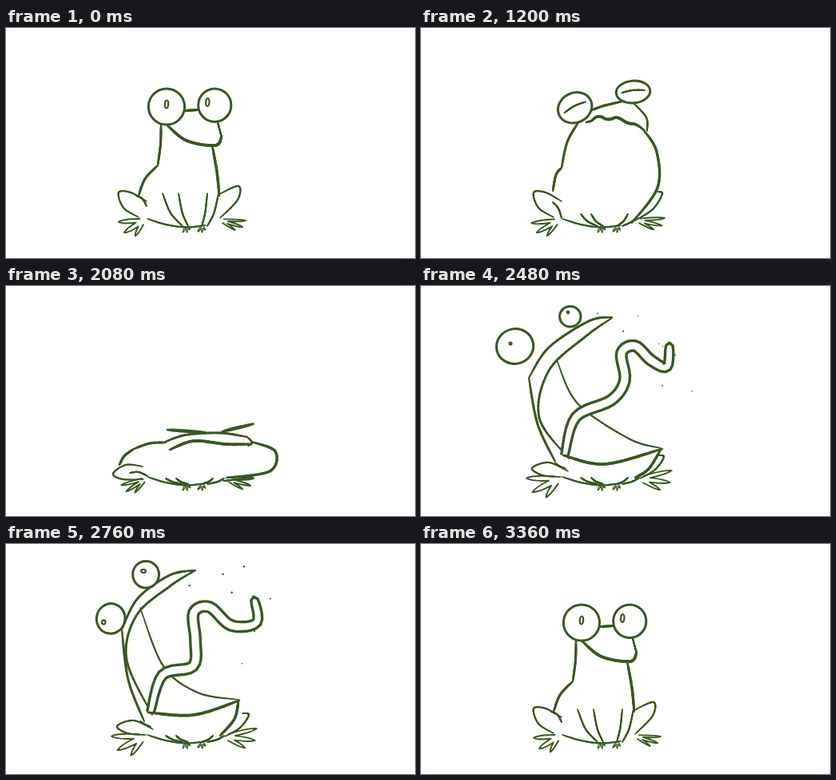
Write an HTML page with a canvas that moves like this. It is 512 px wide and 288 px high and loops after 3440 ms.

```html
<!DOCTYPE html>
<html lang="en">
<head>
<meta charset="utf-8">
<title>Frog</title>
<style>
html, body { margin: 0; width: 100%; height: 100%; overflow: hidden; background: #fff; }
canvas { display: block; width: 100vw; height: 100vh; }
</style>
</head>
<body>
<canvas id="stage" width="512" height="288"></canvas>
<script>
const ctx = document.getElementById('stage').getContext('2d');
const INK = '#37591f';
const LOOP = 3440, TICK = 40;
const RAD = Math.PI / 180;
const WEIGHT = { back: 2.9, hip: 2.9, side: 3.3, top: 2.9, mouth: 3.7 };

const lerp = (a, b, u) => a + (b - a) * u;
const spline = (a, b, c, d, u) =>
  b + .5 * u * (c - a + u * (2 * a - 5 * b + 4 * c - d + u * (3 * (b - c) + d - a)));

// Smooth line through x, y pairs, as evenly counted samples.
function curve(...p) {
  const n = p.length / 2, count = 48, out = [];
  const at = (i, k) => p[2 * Math.max(0, Math.min(n - 1, i)) + k];
  for (let j = 0; j <= count; j++) {
    const s = j / count * (n - 1), i = Math.min(n - 2, Math.floor(s));
    out.push([0, 1].map(k => spline(at(i - 1, k), at(i, k), at(i + 1, k), at(i + 2, k), s - i)));
  }
  return out;
}

// Arms run from a common height down to the two hands.
function arms(top, starts = [200, 213, 259, 273]) {
  const ends = [221, 228, 245, 252];
  return starts.map((x, i) =>
    curve(x, top, lerp(x, ends[i], .4), lerp(top, 248, .6), ends[i], 248));
}

// Trembling lip: a sagging line with a fading ripple.
function wobble() {
  const points = [];
  for (let u = 0; u <= 1.01; u += .08) {
    const ripple = 2.8 * (1 - u * .7) * Math.cos(2 * Math.PI * (u - .2) / .32);
    points.push(207 + 76 * u, 116 - 23 * u + 37 * u * u - ripple);
  }
  return curve(...points);
}

// Eyes: x, y, rx, ry, tilt. Pupils: offset x, y, rx, ry.
// Paws: x, y, angle of the outer toe, angle between toes, length.
const sit = {
  eyes: [[201, 98.5, 22.6, 22.6, 0], [261.3, 96.7, 20.6, 20.7, 0]],
  pupils: [[0, -3, 2.2, 5], [-9, -3.7, 2.2, 5]],
  arms: arms(207, [196, 216, 252, 266]),
  paws: [[174, 240, 175, -27, 33], [266, 240, 2, 15, 34]],
  lines: {
    back: curve(194, 121, 193.5, 145, 190, 172),
    hip: curve(190, 172, 174, 189, 166, 210),
    side: curve(258.5, 149, 264, 180, 267, 210),
    thighLeft: curve(176, 217, 156, 206, 141, 206, 147, 225, 166, 237),
    shin: curve(163, 210, 171, 214, 176, 223),
    thighRight: curve(267, 208, 291, 198, 290, 215, 268, 238),
    top: curve(224, 103.5, 241, 102.5),
    lip: curve(265, 118, 270, 137),
    mouth: curve(201, 121, 226, 141, 262, 147, 270, 135)
  }
};

const puff = {
  eyes: [[192.7, 99.8, 21.8, 18.6, -.45], [265.6, 80, 21.3, 13.9, -.08]],
  pupils: [[-2.2, -5.1, .5, .5], [5.6, -4, 2.2, 2.2]],
  arms: arms(233),
  paws: [[174, 240, 173, -22, 36], [267, 240, -3, 15, 38]],
  lines: {
    back: curve(197, 118, 183, 143, 176, 175),
    hip: curve(176, 175, 169, 184, 165, 204),
    side: curve(279, 128, 295, 155, 296, 200, 264, 244),
    thighLeft: sit.lines.thighLeft,
    shin: curve(165, 218, 172, 226, 176, 238),
    thighRight: curve(296, 205, 302, 208, 290, 227, 268, 241),
    top: curve(213, 103, 230, 97, 252, 92),
    lip: curve(266, 94, 282, 112, 283, 129),
    mouth: wobble()
  }
};

const squat = {
  eyes: [[226, 181.7, 24, .7, .07], [290, 177.5, 20, .7, -.24]],
  pupils: [[0, 0, 0, 0], [0, 0, 0, 0]],
  arms: arms(241),
  paws: [[177, 240, 164, -17, 34], [273, 241, 0, 15, 37]],
  lines: {
    back: curve(200, 196, 180, 197, 160, 204),
    hip: curve(160, 204, 148, 213, 142, 224),
    side: curve(307, 195, 337, 207, 330, 232, 276, 240),
    thighLeft: curve(171, 226, 150, 224, 134, 235, 146, 242, 172, 242),
    shin: curve(155, 234, 166, 233, 177, 238),
    thighRight: curve(309, 239, 290, 242, 272, 244),
    top: curve(197, 196, 225, 186.5, 268, 184, 302, 189),
    lip: curve(302, 189, 308, 196, 303, 200),
    mouth: curve(205, 205, 235, 194, 275, 198, 306, 198)
  }
};

const leanBack = {
  eyes: [[117.6, 75.5, 23.2, 21.8, -.2], [186.8, 38.2, 13.2, 12.8, 0]],
  pupils: [[-5.6, -3.5, 1.5, 1.5], [-2.8, -5.2, 1.3, 1.3]],
  arms: arms(240),
  paws: [[175, 240, 179, -26, 43], [271, 241, -13, 20, 44]],
  lines: {
    back: curve(239, 39, 210, 44, 160, 77, 135, 115),
    hip: curve(135, 115, 146, 173, 168, 220),
    side: curve(300, 205, 285, 229, 268, 240),
    thighLeft: curve(184, 232, 160, 221, 139, 228, 152, 237, 175, 239),
    shin: curve(168, 222, 174, 226, 181, 229),
    thighRight: curve(296, 212, 304, 214, 293, 230, 274, 241),
    top: curve(239, 40, 205, 64, 160, 106, 148, 165, 185, 216),
    lip: curve(170, 93, 196, 147, 260, 191, 300, 203),
    mouth: curve(178, 212, 230, 223, 302, 204)
  },
  tongue: curve(180, 211, 194, 164, 238, 143, 255, 118, 251, 84, 268, 75, 288, 93, 308, 101, 311, 71)
};

const leanFront = {
  ...leanBack,
  eyes: [[131.2, 93.4, 17.8, 18.8, .2], [175.1, 38.2, 16.4, 16.8, 0]],
  pupils: [[-8.9, 4.6, 2.2, 2.6], [-3.1, -4.4, 3, 2]],
  lines: {
    ...leanBack.lines,
    back: curve(237, 33, 205, 39, 165, 68, 145, 107),
    hip: curve(145, 107, 153, 170, 173, 222),
    side: curve(291, 196, 286, 219, 268, 240),
    top: curve(237, 33, 205, 53, 163, 90, 151, 145, 183, 214),
    lip: curve(168, 80, 197, 153, 240, 186, 291, 195),
    mouth: curve(178, 211, 235, 214, 292, 196)
  },
  tongue: curve(181, 210, 196, 164, 234, 153, 237, 120, 235, 86, 255, 79, 282, 102, 314, 98, 310, 66)
};

const belly = curve(177, 239, 200, 246, 226, 249.5, 250, 247);
const hands = [[226, 247, 118, -33, 10], [246, 247, 126, -33, 10]];

// Blends numbers, lists and objects of the same form.
function mix(a, b, u) {
  if (typeof a === 'number') return lerp(a, b, u);
  if (Array.isArray(a)) return a.map((v, i) => mix(v, b[i], u));
  const out = {};
  for (const key in a) if (key in b) out[key] = mix(a[key], b[key], u);
  return out;
}

// Brush line, thinner towards both ends.
function brush(points, weight = 2.2) {
  for (let i = 1; i < points.length; i++) {
    const u = (i - .5) / (points.length - 1);
    ctx.lineWidth = weight * (.65 + .35 * Math.min(1, 5 * Math.min(u, 1 - u)));
    ctx.beginPath();
    ctx.moveTo(...points[i - 1]);
    ctx.lineTo(...points[i]);
    ctx.stroke();
  }
}

// Three toes spread like a fan, joined by notches.
function drawPaw([x, y, angle, gap, length]) {
  const polar = (turn, r) => {
    const a = (angle + gap * turn) * RAD;
    return [x + Math.cos(a) * r, y + Math.sin(a) * r];
  };
  const notch = turn => polar(turn, length * (turn < 0 || turn > 2 ? .2 : .36));
  ctx.lineWidth = length < 15 ? 1.3 : 1.9;
  ctx.beginPath();
  ctx.moveTo(...notch(-.5));
  for (let toe = 0; toe < 3; toe++) {
    const reach = length * (1 - .07 * toe * toe);
    ctx.quadraticCurveTo(...polar(toe - .25, reach * .85), ...polar(toe, reach));
    ctx.quadraticCurveTo(...polar(toe + .25, reach * .85), ...notch(toe + .5));
  }
  ctx.stroke();
}

// Tube around a centre line, open at the root and round at the tip.
function drawTongue(points, grow) {
  const n = Math.floor((points.length - 1) * grow);
  if (n < 5) return;
  const left = [], right = [];
  for (let i = 0; i <= n; i++) {
    const [x, y] = points[i], a = points[Math.max(0, i - 1)], b = points[Math.min(n, i + 1)];
    const dx = b[0] - a[0], dy = b[1] - a[1], size = Math.hypot(dx, dy) || 1;
    const cap = Math.sqrt(1 - Math.max(0, 1 - (n - i) / 2) ** 2);
    const half = Math.min(6.3, 4.3 + i * .25) * lerp(1, .75, Math.max(0, i / n * 4 - 3)) * cap;
    const ox = -dy / size * half, oy = dx / size * half;
    left.push([x + ox, y + oy]);
    right.unshift([x - ox, y - oy]);
  }
  ctx.lineWidth = 3.4;
  ctx.beginPath();
  left.concat(right).forEach(p => ctx.lineTo(...p));
  ctx.fill();
  ctx.stroke();
}

function drawOval(x, y, rx, ry, tilt, weight) {
  ctx.lineWidth = weight;
  ctx.beginPath();
  ctx.ellipse(x, y, Math.max(.1, rx), Math.max(.1, ry), tilt, 0, 7);
  ctx.fill();
  ctx.stroke();
}

function drawEye([x, y, rx, ry, tilt], [px, py, prx, pry], shut) {
  drawOval(x, y, rx, ry, tilt, 3);
  if (shut) {
    const dx = Math.cos(tilt) * rx * .68, dy = Math.sin(tilt) * rx * .68;
    brush(curve(x - dx, y - dy, x - 1, y - 2, x + dx, y + dy - 1));
  } else if (prx > .2) {
    drawOval(x + px, y + py, prx, pry, .05, 2.2);
  }
}

// Repeatable noise in 0..1
const noise = seed => Math.abs(Math.sin(seed * 127.1) * 43758.5453) % 1;

function drawSpit(age) {
  const burst = Math.floor(age / 280), flown = age % 280 / 280;
  ctx.fillStyle = INK;
  for (let i = 1; i < 9; i++) {
    const seed = i + burst * 20;
    const angle = lerp(-115, 35, noise(seed)) * RAD;
    const far = lerp(60, 115, noise(seed + .3)) * lerp(.8, 1.2, flown);
    ctx.beginPath();
    ctx.arc(235 + Math.cos(angle) * far, 120 + Math.sin(angle) * far, lerp(.6, 1.5, noise(seed + .6)), 0, 7);
    ctx.fill();
  }
}

// Progress in equal jumps, the first at start and the last at end.
const steps = (t, start, end, count) =>
  Math.min(count, Math.floor((t - start) / (end - start) * (count - 1)) + 1) / count;
const easeInOut = u => u * u * (3 - 2 * u);

function poseAt(t) {
  if (t < 360 || t >= 3360) return sit;
  if (t < 600) return mix(sit, puff, easeInOut(steps(t, 360, 600, 5)));
  if (t < 1920) return puff;
  if (t < 2080) return mix(puff, squat, t < 2000 ? -.11 : .6);
  if (t < 2280) return squat;
  if (t < 2480) return mix(squat, leanBack, 1 - (1 - (t - 2240) / 240) ** 2);
  if (t < 3120) {
    const sway = .5 - .5 * Math.cos(Math.PI * (Math.min(t, 3040) - 2480) / 280);
    return mix(leanBack, leanFront, sway);
  }
  return mix(leanBack, sit, easeInOut(steps(t, 3120, 3360, 5)));
}

function draw(t) {
  ctx.fillStyle = '#fff';
  ctx.fillRect(0, 0, 512, 288);
  ctx.strokeStyle = INK;
  ctx.lineCap = ctx.lineJoin = 'round';

  const pose = poseAt(t);
  const { mouth, ...lines } = pose.lines;
  [...pose.paws, ...hands].forEach(drawPaw);
  [...pose.arms, belly].forEach(line => brush(line));
  for (const name in lines) brush(lines[name], WEIGHT[name]);

  const grow = Math.min(1, (t - 2280) / 200, (3200 - t) / 160);
  if (grow > 0) drawTongue(pose.tongue || leanBack.tongue, grow);
  brush(mouth, WEIGHT.mouth);

  const shut = [1200, 1640].some(start => t >= start && t < start + 40);
  pose.eyes.forEach((eye, i) => drawEye(eye, pose.pupils[i], shut));
  if (t >= 2360 && t < 3120) drawSpit(t - 2360);
}

const begin = performance.now();
function tick() {
  const t = (performance.now() - begin) % LOOP;
  draw(Math.floor(t / TICK) * TICK);
  requestAnimationFrame(tick);
}
tick();
</script>
</body>
</html>
```
